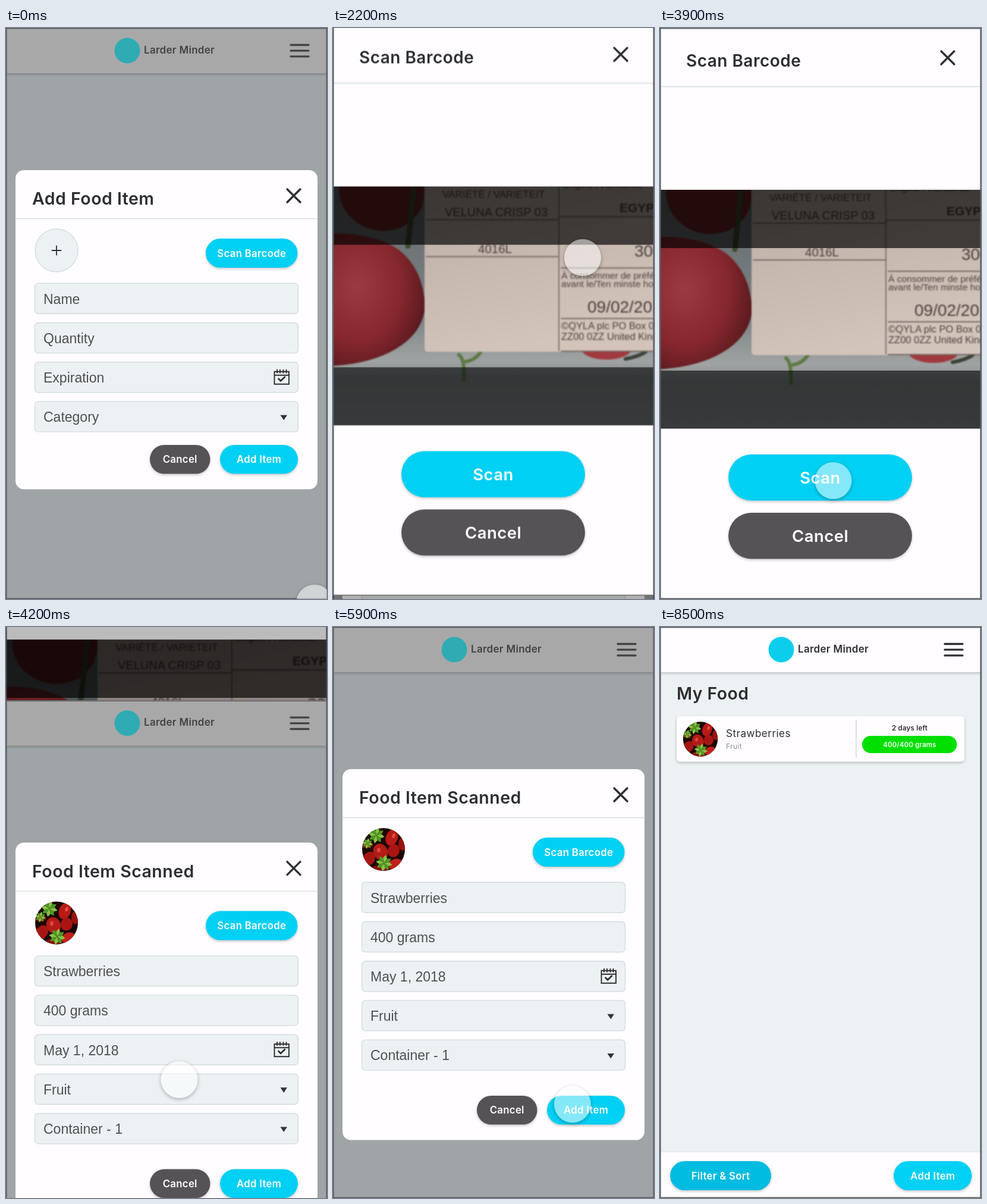
Recreate the animation shown at these times as an HTML page. Size 540 by 960 pixels, loop 8600 ms.

```html
<!DOCTYPE html>
<html lang="en">
<head>
<meta charset="utf-8">
<title>Pantry app flow</title>
<style>
  html, body { margin: 0; width: 100%; height: 100%; overflow: hidden; background: #9fa5a7; }
  #stage { position: absolute; inset: 0; width: 540px; height: 960px; overflow: hidden; }
  svg { display: block; }
  text { font-family: Inter, sans-serif; font-weight: 600; letter-spacing: .017em; fill: #2e2d30; }
  .light { font-weight: 400; letter-spacing: .03em; }
  .field { font: 400 23px "Liberation Sans", sans-serif; letter-spacing: 0; fill: #505052; }
  .label text { font-family: "Liberation Sans", sans-serif; font-weight: 400; letter-spacing: 0; fill: #4a403d; }
  .shadow { filter: drop-shadow(0 2px 2px rgba(0, 0, 0, .22)); }
  .soft { filter: blur(.8px); }
  .line { fill: none; stroke: #2e2d30; stroke-linecap: round; }

  .screen, #cursor, #cursor i {
    animation: 8.6s cubic-bezier(.215, .61, .355, 1) infinite both;
  }
  #add { animation-name: add; }
  #scan { animation-name: scan; }
  #scanned { animation-name: scanned; }
  #list { animation-name: appear; animation-timing-function: linear; }
  #cursor { position: absolute; left: -31px; top: -31px; animation-name: pointer; }
  #cursor i {
    display: block; width: 62px; height: 62px; border-radius: 50%;
    background: rgba(255, 255, 255, .52);
    box-shadow: 0 2px 6px rgba(0, 0, 0, .3);
    animation-name: vanish; animation-timing-function: linear;
  }

  @keyframes add {
    0%, 20.93% { transform: translateY(0); filter: brightness(1); }
    26.29%, 100% { transform: translateY(288px); filter: brightness(.7); }
  }
  @keyframes scan {
    0%, 20.93% { transform: translateY(-960px); filter: brightness(1); }
    26.29%, 46.2% { transform: translateY(0); filter: brightness(1); }
    51.56%, 100% { transform: translateY(-288px); filter: brightness(.7); }
  }
  @keyframes scanned {
    0%, 46.2% { transform: translateY(960px); }
    51.56%, 100% { transform: translateY(0); }
  }
  @keyframes appear { 0%, 74.42% { opacity: 0; } 77.91%, 100% { opacity: 1; } }
  @keyframes vanish { 0%, 74.42% { opacity: 1; } 77.91%, 100% { opacity: 0; } }
  @keyframes pointer {
    0% { transform: translate(519px, 967px); animation-timing-function: ease-in-out; }
    17.44% { transform: translate(420px, 386px); }
    31.4% { transform: translate(420px, 386px); animation-timing-function: ease-in; }
    36.05% { transform: translate(398px, 545px); animation-timing-function: ease-out; }
    41.86% { transform: translate(291.5px, 761px); }
    60.47% { transform: translate(291.5px, 761px); animation-timing-function: ease-in-out; }
    73.26%, 100% { transform: translate(445px, 818px); }
  }
</style>
</head>
<body>
<div id="stage"><div id="cursor"><i></i></div></div>
<script>
const CYAN = '#00d0f3', GREY = '#555356', WHITE = '#fffdff', PALE = '#ecf2f4', EDGE = '#d3dcdf';

const rect = (x, y, w, h, fill, r = 0, extra = '') =>
  `<rect x="${x}" y="${y}" width="${w}" height="${h}" rx="${r}" fill="${fill}" ${extra}/>`;
const text = (x, y, size, words, extra = '') =>
  `<text x="${x}" y="${y}" font-size="${size}" ${extra}>${words}</text>`;
const centred = (x, y, size, words, fill = '#2e2d30') =>
  text(x, y, size, words, `text-anchor="middle" style="fill:${fill}"`);
const line = (d, width, extra = '') => `<path class="line" d="${d}" stroke-width="${width}" ${extra}/>`;
const circle = (x, y, r, fill, extra = '') => `<circle cx="${x}" cy="${y}" r="${r}" fill="${fill}" ${extra}/>`;
const ellipse = (x, y, rx, ry, fill, turn = 0) =>
  `<ellipse rx="${rx}" ry="${ry}" fill="${fill}" transform="translate(${x} ${y}) rotate(${turn})"/>`;

const button = (x, y, w, h, fill, words, size = 16.8) =>
  rect(x, y, w, h, fill, h / 2, 'class="shadow"') + centred(x + w / 2, y + h / 2 + size * .36, size, words, WHITE);
const close = y => line(`M473 ${y - 11}l22 22m0-22l-22 22`, 3.4);

const screen = (id, fill, content) => `<g id="${id}" class="screen">
  ${rect(0, 0, 540, 960, fill)}${content}
  ${rect(.75, .75, 538.5, 958.5, 'none', 0, 'stroke="#5b5b5e" stroke-width="1.5"')}</g>`;

function header(dim) {
  const ink = dim ? '#424144' : '#2e2d30';
  return rect(0, 0, 540, 76, dim ? '#a9a8a9' : WHITE, 0, 'class="shadow"')
    + circle(204, 38, 21.5, dim ? '#2fabb3' : '#0ccdec')
    + text(232, 42.5, 17, 'Larder Minder', `style="fill:${ink}"`)
    + line('M479 28.5h30m-30 9.7h30m-30 9.7h30', 3.3, `style="stroke:${ink}"`);
}

// Berry photo reduced to flat shapes in a circle of radius 36.
function leaf(x, y, size) {
  let out = '';
  for (let a = 0; a < 360; a += 45)
    out += `<path d="M0 0L${size * .6} ${-size * .24}L${size} 0L${size * .6} ${size * .24}Z"
      fill="${a % 90 ? '#4f9a26' : '#86c544'}" transform="translate(${x} ${y}) rotate(${a + 12})"/>`;
  return out;
}
const berries = (x, y, scale) => `<g transform="translate(${x} ${y}) scale(${scale})" clip-path="url(#round)">
  ${circle(0, 0, 37, '#1d0806')}
  ${ellipse(14, -20, 10, 14, '#b81a16', 20)}${ellipse(-5, 4, 12, 14, '#b51b17', -25)}
  ${ellipse(17, 2, 10, 11, '#a81512', 15)}${ellipse(-25, 16, 10, 13, '#a51613', 35)}
  ${ellipse(20, 25, 12, 9, '#c0221b', -20)}${ellipse(-27, -8, 9, 6, '#8e100d')}
  ${ellipse(32, -9, 7, 11, '#99120f')}${ellipse(-5, 33, 14, 7, '#8a0f0c')}
  ${ellipse(17, -23, 2.5, 4, '#dd5147', 20)}${ellipse(-8, 1, 3, 4, '#d9463d')}
  ${leaf(-12, -24, 14)}${leaf(-27, -10, 9)}${leaf(1, 23, 14)}</g>`;

const calendar = y => line(`M451.5 ${y - 10}h24.5v21h-24.5zm0 6h24.5M456 ${y - 13}v5m5-5v5m5.5-5v5m5-5v5`, 1.9)
  + line(`M458.5 ${y + 2}l3.6 3.6l6.8-6.6`, 2.7);

function modal(title, values, photo, bottom) {
  const fields = values.map((value, i) => {
    const y = 429.3 + 66.2 * i;
    const icon = i === 2 ? calendar(y + 26)
      : i > 2 ? `<path d="M461.5 ${y + 22.8}h11.5l-5.75 8.6z" fill="#343437"/>` : '';
    return rect(48.5, y, 443, 51, PALE, 6, `stroke="${EDGE}" stroke-width="1.4"`)
      + `<text class="field" x="63" y="${y + 34.3}">${value}</text>` + icon;
  }).join('');
  return header(true)
    + rect(16, 239, 508, bottom - 239, WHITE, 14)
    + text(44, 297, 28.5, title) + close(282)
    + line('M16 320.5H524', 1.4, `style="stroke:${EDGE}"`)
    + photo + button(336, 354, 154.5, 49, CYAN, 'Scan Barcode') + fields
    + button(242, bottom - 74.5, 101.5, 48.5, GREY, 'Cancel')
    + button(360, bottom - 74.5, 131, 48.5, CYAN, 'Add Item');
}

const emptyPhoto = circle(85, 374, 36, PALE, `stroke="${EDGE}" stroke-width="1.4"`)
  + line('M77.5 374h15m-7.5-7.5v15', 1.8);

const photo = `<g clip-path="url(#window)">
  ${rect(0, 272, 540, 402, 'url(#tray)')}
  <g class="soft">
    ${ellipse(82, 280, 72, 66, '#6c2024', 15)}
    ${line('M136 272Q132 320 126 372', 9, 'style="stroke:#3d4a2c"')}
    ${ellipse(460, 545, 42, 18, '#a13a3e')}
    ${line('M492 562q22-4 34-12', 6, 'style="stroke:#3c4138"')}
    <path d="M-20 352Q62 346 110 378Q152 410 155 474Q150 528 84 556Q40 574-20 574Z" fill="url(#berry)"/>
    ${line('M212 555q10 8 8 42m0-30q18-2 28-16', 6, 'style="stroke:#5d7a45"')}
    ${rect(154, 250, 410, 300, 'url(#paper)', 6)}
    ${line('M157 328H380M157 390H380M380 272V548M380 323H540M384 409H540M384 494H540M384 549H540', 1.8, 'style="stroke:#776a65"')}
    <g class="label">
      ${text(184, 291, 17, 'VARIÉTÉ / VARIETEIT')}${text(188, 322, 20, 'VELUNA CRISP 03')}
      ${text(244, 384, 20.5, '4016L')}${text(386, 275, 16, 'Origine / Herkomst')}
      ${text(482, 315, 21, 'EGYPTE', 'style="font-weight:700"')}${text(507, 390, 28, '300')}
      ${text(384, 427, 15.5, 'À consommer de préférence')}${text(384, 441, 15.5, 'avant le/Ten minste houdbaar')}
      ${text(428, 484, 28, '09/02/2018')}
      ${text(384, 512, 16.5, '©QYLA plc PO Box 000')}${text(384, 530, 16.5, 'ZZ00 0ZZ United Kingdom')}
    </g>
  </g>
  ${rect(0, 272, 540, 98, '#000', 0, 'opacity=".68"')}
  ${rect(0, 576, 540, 98, '#000', 0, 'opacity=".6"')}
</g>`;

const scanView = text(44, 64.5, 28, 'Scan Barcode') + close(50)
  + line('M0 98.5H540', 1.3, `style="stroke:${EDGE}"`) + photo
  + button(115, 717, 309, 77.5, CYAN, 'Scan', 27.5)
  + button(115, 815, 309, 77.5, GREY, 'Cancel', 27.5);

const listView = header(false) + text(28, 122, 28.3, 'My Food')
  + rect(28, 150, 484, 76.5, WHITE, 5, 'class="shadow"') + berries(68, 188.5, .81)
  + text(111, 184.5, 17, 'Strawberries', 'class="light"')
  + text(111, 204.5, 12, 'Fruit', 'class="light" style="fill:#8e8e90"')
  + line('M330 156.5V219.5', 1.4, 'style="stroke:#d0d3d5"')
  + centred(420, 174, 11.6, '2 days left')
  + rect(340, 183, 159.5, 29, '#00e000', 14.5) + centred(420, 201.5, 11.4, '400/400 grams', WHITE)
  + rect(0, 883, 540, 77, WHITE) + line('M0 882.5H540', 1, 'style="stroke:#dfe5e7"')
  + button(17, 898, 170, 49, '#00bce0', 'Filter &amp; Sort')
  + button(393, 898, 131.5, 49, CYAN, 'Add Item');

const defs = `<defs>
  <clipPath id="round"><circle r="36"/></clipPath>
  <clipPath id="window"><rect y="272" width="540" height="401.5"/></clipPath>
  <linearGradient id="tray" x2="0" y2="1">
    <stop offset="0" stop-color="#62686b"/><stop offset=".55" stop-color="#7d8486"/>
    <stop offset=".73" stop-color="#a0a3a3"/><stop offset=".8" stop-color="#83888a"/><stop offset="1" stop-color="#8d8f92"/>
  </linearGradient>
  <linearGradient id="paper" x2=".3" y2="1">
    <stop offset="0" stop-color="#b9aaa3"/><stop offset="1" stop-color="#d3c4bb"/>
  </linearGradient>
  <radialGradient id="berry" cx=".35" cy=".4" r=".7">
    <stop offset="0" stop-color="#9c3a40"/><stop offset=".6" stop-color="#86272d"/><stop offset="1" stop-color="#55191d"/>
  </radialGradient>
</defs>`;

document.getElementById('stage').insertAdjacentHTML('afterbegin',
  `<svg width="540" height="960" viewBox="0 0 540 960">${defs}
  ${screen('add', '#9fa5a7', modal('Add Food Item', ['Name', 'Quantity', 'Expiration', 'Category'], emptyPhoto, 775.5))}
  ${screen('scan', WHITE, scanView)}
  ${screen('scanned', '#9fa5a7', modal('Food Item Scanned',
    ['Strawberries', '400 grams', 'May 1, 2018', 'Fruit', 'Container - 1'], berries(85, 374, 1), 862.5))}
  ${screen('list', PALE, listView)}</svg>`);
</script>
</body>
</html>
```
